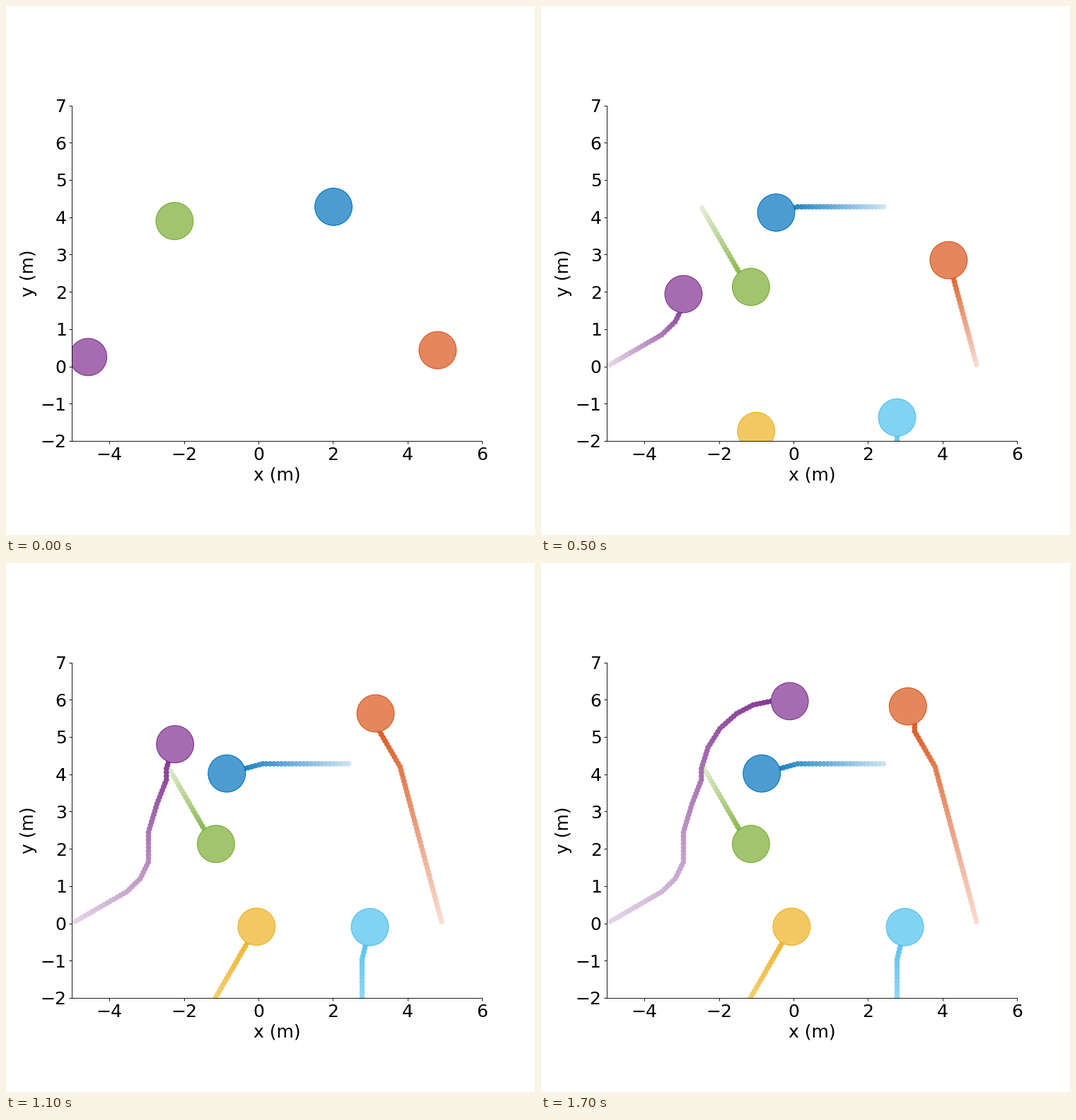
Animation of 748 by 748 pixels, one loop 2.7 s. Source, as a matplotlib script:

```python
import matplotlib.pyplot as plt
import numpy as np
from matplotlib.animation import FuncAnimation
from matplotlib.colors import to_rgb
from matplotlib.patches import Circle
from matplotlib.ticker import MultipleLocator

SIZE, DPI = 748, 80
STEP = 0.1             # metres walked per simulation step
STEPS_PER_FRAME = 5
START_RADIUS = 5
DISC_RADIUS = 0.5

plt.rcParams.update({"font.family": "DejaVu Sans", "font.size": 22.5})

# Agents start evenly spaced on a circle and walk through a few turning points.
ROUTES = {
    "#D95319": [(4.91, 0.05), (4.86, 0.24), (3.8, 4.2), (3.25, 5.15),
                (3.25, 5.35), (3.07, 5.82)],
    "#0072BD": [(2.41, 4.28), (0.11, 4.28), (-0.85, 4.02)],
    "#77AC30": [(-1.35, 2.34), (-1.14, 2.13)],
    "#7E2F8E": [(-3.53, 0.85), (-3.17, 1.2), (-2.95, 1.65), (-2.95, 2.45),
                (-2.72, 3.21), (-2.47, 3.85), (-2.47, 4.15), (-2.29, 4.72),
                (-1.97, 5.23), (-1.52, 5.63), (-1.08, 5.86), (-0.6, 5.96),
                (-0.1, 5.96)],
    "#EDB120": [(-0.05, -0.09)],
    "#4DBEEE": [(2.78, -3.27), (2.78, -0.97), (2.99, -0.1)],
}


def tint(color, strength):
    """Mix a colour with white; strength 1 keeps the pure colour."""
    strength = np.atleast_1d(strength)[:, None]
    return 1 - strength * (1 - np.array(to_rgb(color)))


def walk(bearing, turns):
    """Positions after each equal step along the route."""
    start = START_RADIUS * np.cos(bearing), START_RADIUS * np.sin(bearing)
    points = np.array([start, *turns])
    legs = np.hypot(*np.diff(points, axis=0).T)
    travelled = np.concatenate([[0], np.cumsum(legs)])
    length = travelled[-1]
    marks = np.linspace(0, length, round(length / STEP) + 1)[1:]
    return np.column_stack([np.interp(marks, travelled, axis) for axis in points.T])


class Agent:
    def __init__(self, ax, color, path):
        self.color = color
        self.path = path
        self.trail = ax.scatter([], [], zorder=1)
        self.disc = Circle((0, 0), DISC_RADIUS, facecolor=tint(color, 0.7)[0],
                           edgecolor=color, linewidth=1, zorder=2)
        ax.add_patch(self.disc)

    def show(self, step):
        visited = self.path[:step]
        self.trail.set_offsets(visited)
        self.trail.set_color(tint(self.color, np.linspace(0.2, 1, len(visited))))
        self.disc.center = visited[-1]


fig, ax = plt.subplots(figsize=(SIZE / DPI, SIZE / DPI), dpi=DPI)
fig.subplots_adjust(left=0.1249)
ax.set_aspect("equal")
ax.set(xlim=(-5, 6), ylim=(-2, 7), xlabel="x (m)", ylabel="y (m)")
ax.xaxis.set_major_locator(MultipleLocator(2))
ax.yaxis.set_major_locator(MultipleLocator(1))
ax.spines[["top", "right"]].set_visible(False)

agents = [Agent(ax, color, walk(i * 2 * np.pi / len(ROUTES), turns))
          for i, (color, turns) in enumerate(ROUTES.items())]


def draw(frame):
    for agent in agents:
        agent.show((frame + 1) * STEPS_PER_FRAME)


anim = FuncAnimation(fig, draw, frames=27, interval=100, init_func=lambda: draw(0),
                     repeat=True, repeat_delay=0, blit=False)
plt.show()
```
